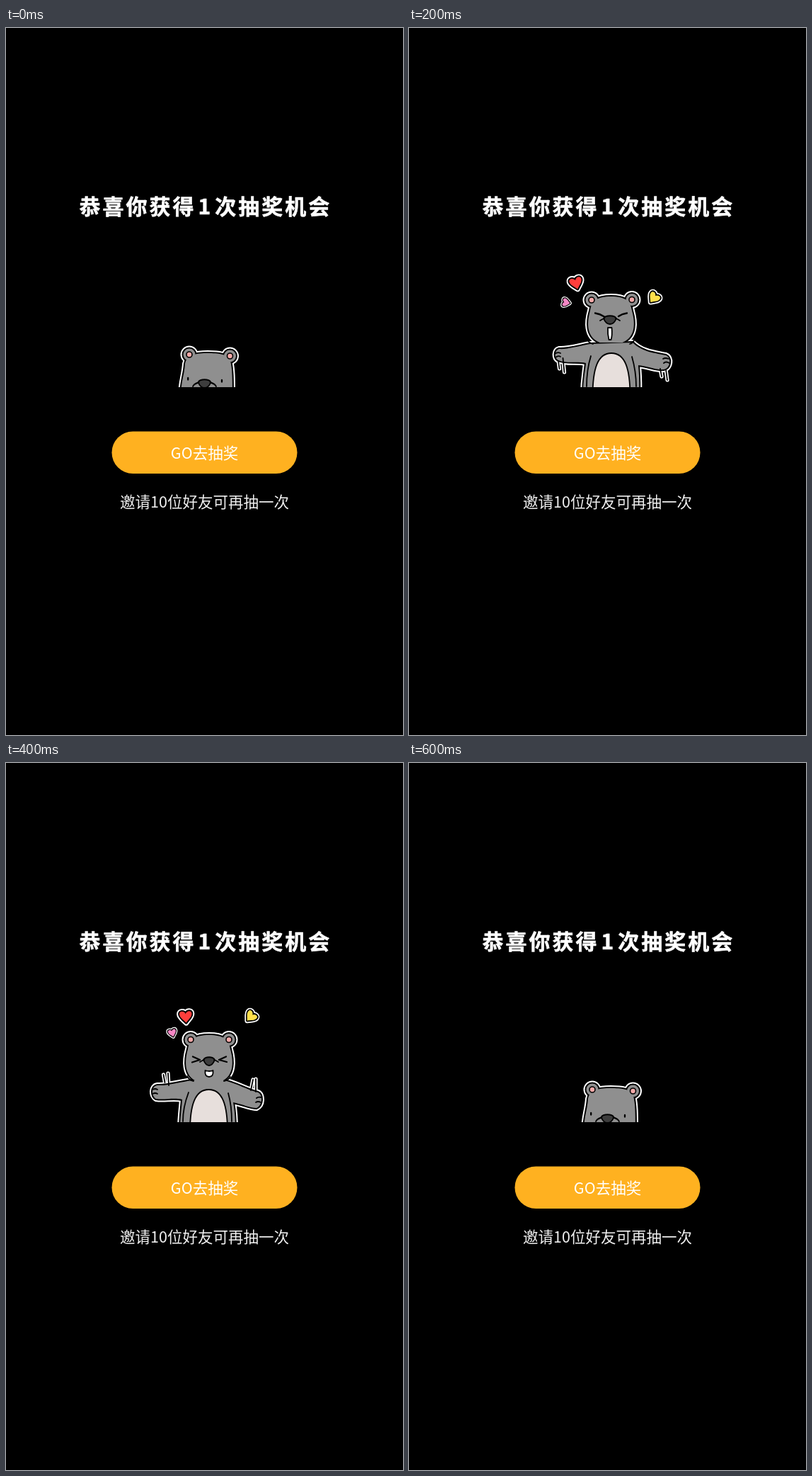
An HTML page for the animation above (0.7 s loop, 561 by 998 pixels).

```html
<!DOCTYPE html>
<html lang="zh">
<head>
<meta charset="utf-8">
<style>
html, body { margin: 0; width: 100%; height: 100%; overflow: hidden; background: #000; }
svg { display: block; width: 561px; height: 998px; }
text { fill: #fff; font-family: "Noto Sans CJK SC", "Noto Sans CJK", sans-serif; }
.title { font-size: 30px; font-weight: 900; letter-spacing: 3px; stroke: #fff; stroke-width: .6; stroke-linejoin: round; }
.label { font-size: 21.5px; text-anchor: middle; }
.halo, .ink, .line { stroke-linecap: round; stroke-linejoin: round; }
.halo { fill: #fff; stroke: #fff; stroke-width: 8; }
.ink { fill: #000; stroke: #000; stroke-width: 4; }
.fur { fill: #8f8f8f; }
.line { fill: none; stroke: #000; stroke-width: 1.8; }
.eyes { stroke-width: 2.3; }
.trail { fill: none; stroke-width: 5.2; }
.strip { animation: flip 700ms steps(7) infinite; }
@keyframes flip { to { transform: translateX(-3927px); } }
</style>
</head>
<body>
<svg viewBox="0 0 561 998">
  <defs>
    <clipPath id="window"><rect x="190" y="330" width="195" height="176.5"/></clipPath>
    <path id="heart" d="M0 9C-4 4 -9 1 -9 -4C-9 -9 -2 -9 0 -4C2 -9 9 -9 9 -4C9 1 4 4 0 9Z"/>
  </defs>
  <rect width="561" height="998"/>
  <text class="title" x="103.5" y="262.5">恭喜你获得<tspan dx="3">1</tspan><tspan dx="3">次抽奖机会</tspan></text>
  <g clip-path="url(#window)"><g class="strip" id="strip"></g></g>
  <rect x="149.5" y="569.5" width="262" height="59.5" rx="29.75" fill="#ffb120"/>
  <text class="label" x="280.5" y="607.5">GO去抽奖</text>
  <text class="label" x="280.5" y="677" fill-opacity=".94">邀请10位好友可再抽一次</text>
</svg>
<script>
const CELL = 561;
const path = (d, cls = '', fill = '') =>
  `<path d="${d}"${cls && ` class="${cls}"`}${fill && ` style="fill:${fill}"`}/>`;
const circle = ([x, y], r) => `<circle cx="${x}" cy="${y}" r="${r}"/>`;

// Head outline from its left, right, top and chin.
function head(l, r, t, b) {
  const c = (l + r) / 2;
  return path(`M${c} ${t}C${r - 14} ${t} ${r - 6} ${t + 6} ${r - 4} ${t + 20}
    C${r} ${t + 34} ${r + 3} ${b - 4} ${c + 16} ${b + 4}H${c - 16}
    C${l - 3} ${b - 4} ${l} ${t + 34} ${l + 4} ${t + 20}C${l + 6} ${t + 6} ${l + 14} ${t} ${c} ${t}Z`);
}

function belly(l, r, t) {
  const c = (l + r) / 2;
  return path(`M${l} 520C${l} ${t + 22} ${l + 7} ${t} ${c} ${t}S${r} ${t + 22} ${r} 520Z`, 'line', '#e7dfdc');
}

function nose([x, y], w) {
  return path(`M${x - w} ${y - 2}C${x - w + 3} ${y - 7} ${x + w - 3} ${y - 7} ${x + w} ${y - 2}
    C${x + w - 2} ${y + 3} ${x + 4} ${y + 6} ${x} ${y + 6}S${x - w + 2} ${y + 3} ${x - w} ${y - 2}Z`, 'line', '#3d3d3d')
    + path(`M${x - w - 5} ${y + 1}q3 -2 6 -3M${x + w + 5} ${y + 1}q-3 -2 -6 -3`, 'line');
}

function heart(color, x, y, turn, size) {
  const use = (cls, fill) => `<use href="#heart" class="${cls}" ${fill ? `fill="${fill}"` : ''}/>`;
  const unscaled = 'vector-effect="non-scaling-stroke"';
  return `<g transform="translate(${x} ${y}) rotate(${turn}) scale(${size})" ${unscaled}>`
    + use('halo') + use('ink') + use('', color) + '</g>';
}

function hearts(red, pink, yellow) {
  return heart('#ff3e3c', ...red, .97) + heart('#f487c4', ...pink, .62) + heart('#ffdf4b', ...yellow, .86);
}

function bear(p) {
  const shape = p.ears.map(e => circle(e, 8.5)).join('') + p.shape;
  const trail = p.trail || '';
  return `<g class="halo">${shape}</g>` + path(trail, 'halo trail')
    + `<g class="ink">${shape}</g><g class="fur">${shape}</g>`
    + p.ears.map(e => `<g class="line" style="fill:#f4a9a8;stroke-width:1.6">${circle(e, 4)}</g>`).join('')
    + (p.belly ? belly(...p.belly) : '')
    + path(p.lines, 'line') + path(p.eyes, 'line eyes')
    + (p.mouth ? path(p.mouth, 'line', '#fff') : '')
    + nose(p.nose, p.noseWidth || 8) + path(trail, 'line') + (p.extra || '');
}

const peek = {
  ears: [[259, 461], [316.5, 463]],
  shape: path('M285 459C300 459 313 460 317 470C320 482 320 495 320 520H247C247 500 252 490 253 474C255 461 270 459 285 459Z'),
  lines: 'M264 506q2 -4 7 -5M297 506q-2 -4 -7 -5',
  eyes: 'M257.2 494v2.5M305 497v2.5',
  nose: [280.5, 502], noseWidth: 9
};

const rise = {
  ears: [[255.5, 402], [315, 403]],
  shape: circle([317, 463], 8) + head(251, 318, 397, 458)
    + path('M262 455C250 464 242 480 221 503L218 520H352L346 503C335 492 333 468 314 457Z'),
  belly: [263, 309, 472],
  lines: 'M258 471C256 484 250 494 250 506M312 472C315 484 319 494 319 506M313 458C326 465 330 476 334 488M316 455q7 2 7 9M226 502l-3 4M340 501l4 5',
  eyes: 'M259 425q6 1 12 4.500M310 424q-7 1 -13 5',
  mouth: 'M277.500 444q4 2 8 0q0 10 -3 14q-4 -4 -5 -14Z',
  nose: [281.5, 434]
};

const wide = {
  ears: [[258, 384], [315, 383.5]],
  shape: head(252, 319, 379, 440)
    + path('M256 446C240 449 222 454 212 453C205 455 205 466 211 469C222 474 238 470 250 473C249 485 246 495 246 520H325C326 500 325 490 324 476C340 478 350 483 360 482C370 480 371 465 363 462C350 459 330 458 316 444Z'),
  belly: [259.5, 312.5, 459],
  lines: 'M257 463C253 476 251 490 251 506M315 464C319 478 321 490 321 506M252 440q3 5 8 6M318 441q-2 4 -6 5M206 460q4 -3 8 -1M207 465q4 -3 7 -1M367 467q-5 -2 -8 0M368 473q-5 -3 -8 0',
  eyes: 'M263 402.500q7 1 13 5M308 402.500q-7 1 -12 4.500',
  mouth: 'M281 423h5.500q1 11 -1 17h-3q-2 -8 -1.500 -17Z',
  nose: [284, 412], noseWidth: 9,
  trail: 'M211 470l1.500 11M217.500 466l2 20M355 481l2 11M363 482l2 15',
  extra: hearts([236, 360, -15], [222, 387.5, -80], [346, 381, 38])
};

const lift = {
  ears: [[257, 398.5], [318.5, 400.5]],
  shape: head(251, 325, 392, 447)
    + path('M266 448C250 447 238 432 228 420C222 414 211 418 211 428C213 440 230 466 250 474C248 488 246 500 246 520H325C325 500 324 485 321 475C340 470 356 461 368 447C370 436 362 431 355 434C342 441 326 449 308 449Z'),
  belly: [260, 314.5, 462],
  lines: 'M258 466C254 478 251 492 251 506M315 467C318 480 320 492 320 506M254 443q5 6 12 7M320 445q-5 5 -12 5M213 424q4 -2 6 2M219 419q4 0 5 4M357 435q1 4 5 6M363 434q0 4 5 6',
  eyes: 'M259 421.500q7 -1 14 2M313 421.500q-8 -1 -15 2',
  mouth: 'M279.500 437q6 2 12 0q0 10 -6 10t-6 -10Z',
  nose: [286, 427], noseWidth: 7,
  trail: 'M210.500 435l-1 11M215 438l-1 7M361 455l1 11M368 452l.5 11',
  extra: hearts([268.5, 374.5, 12], [234.5, 401, 85], [331, 361.5, 18])
};

const spread = {
  ears: [[261, 390.5], [315, 390.5]],
  shape: head(253, 321, 384, 446)
    + path('M264 448C246 450 228 456 214 455C205 456 205 470 212 474C224 476 236 472 249 475C248 488 246 500 246 520H324C324 500 323 490 321 479C335 482 345 487 354 487C363 483 363 468 356 465C342 462 326 452 308 448Z'),
  belly: [260, 313, 461],
  lines: 'M258 465C253 478 250 492 250 506M314 466C318 480 319 492 319 506M256 442q3 6 9 7M317 443q-3 5 -9 6M207 461q4 -2 7 0M207 467q4 -2 7 0M361 472q-5 -1 -7 1M360 479q-4 -2 -7 0',
  eyes: 'M264 414.500l10 4.500l-11 3.500M311 414.500l-10 4.500l11 3',
  mouth: 'M281.500 434q6 2 11 0q1 9 -5.500 9t-5.500 -9Z',
  nose: [287, 421],
  trail: 'M222.500 440l2 11M229 438l1 17M349 447l-3 15M353 446l0 18',
  extra: hearts([254, 358, -4], [235, 381, -15], [346, 358, 42])
};

const lower = {
  ears: [[256.5, 398.5], [317, 400.5]],
  shape: head(250, 325, 392, 447)
    + path('M260 450C244 460 236 472 226 477C216 476 213 486 218 492C226 499 238 494 247 485C245 496 244 505 244 520H328C328 505 328 495 326 484C334 494 346 500 354 494C359 488 357 480 349 476C340 470 328 456 316 450Z'),
  belly: [256.5, 316.5, 462],
  lines: 'M257 466C250 476 247 486 246 498M316 466C322 476 325 486 326 498M254 443q4 5 10 7M320 445q-4 4 -9 5M217 484q5 -2 8 1M219 490q4 -3 7 -1M355 485q-4 -2 -7 1M353 491q-3 -3 -7 -1',
  eyes: 'M260 420l13 4.500l-13 3M314 420l-13 4.500l13 2',
  mouth: 'M277.500 437q8 2 15 0q0 11 -7.500 11t-7.500 -11Z',
  nose: [285.5, 427],
  trail: 'M221 469l1 12M227 468l-1 10M353 463l-1 14M358 477l-2 8',
  extra: hearts([225, 357.5, -40], [217, 380, -68], [320.5, 353, 2])
};

document.getElementById('strip').innerHTML = [peek, rise, wide, lift, spread, lower, peek]
  .map((pose, i) => `<g transform="translate(${i * CELL} 0)">${bear(pose)}</g>`).join('');
</script>
</body>
</html>
```
